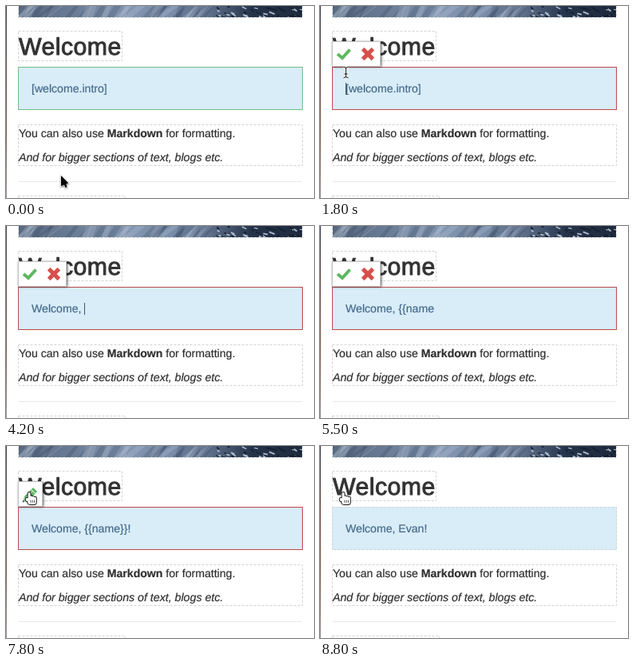
Recreate the animation shown at these times as an HTML page with a canvas. Size 386x240 px, loop 8.9 s.

```html
<!DOCTYPE html>
<html lang="en">
<head>
<meta charset="utf-8">
<title>Inline editing</title>
<style>
  html, body { margin: 0; width: 100%; height: 100%; overflow: hidden; background: #fff; }
  canvas { display: block; width: 386px; height: 240px; }
</style>
</head>
<body>
<canvas id="stage" width="386" height="240"></canvas>
<script>
const ctx = document.getElementById('stage').getContext('2d');
const LOOP = 8900, STEP = 100;
const FONT = '"Liberation Sans", Arial, sans-serif';
const RED = '#bd494a', GREEN = '#70bd86', GREY = '#d2d2d2', INK = '#2f2f2f';

const EDIT = 1100, SELECT = 1900, CLEAR = 2200, RETURN = 6700, SAVE = 7800, RELOAD = 8500;

// Typing comes in bursts with an even gap between keys
const TYPED = 'Welcome, {{name}}!';
const burst = (at, gap, length) => Array.from({ length }, (_, i) => at + i * gap);
const KEYS = [...burst(2700, 100, 2), ...burst(3100, 175, 13), ...burst(5700, 350, 3)];

const ENTRY = { x: 69, y: 212 }, GAP = { x: 48, y: 119 };
const BUTTON = { x: 29, y: 58 }, COPY = { x: 32, y: 83 };

function glide(from, to, start, end, t) {
  const k = Math.min(1, Math.max(0, (t - start) / (end - start)));
  return { x: from.x + (to.x - from.x) * k, y: from.y + (to.y - from.y) * k };
}

function pointer(t) {
  if (t <= 400) return glide(ENTRY, GAP, 0, 400, t);
  if (t <= EDIT) return glide(GAP, BUTTON, 400, 900, t);
  if (t < RETURN) return glide(BUTTON, COPY, EDIT, 1700, t);
  return glide(COPY, BUTTON, RETURN, 7400, t);
}

function seeded(seed) {
  return () => (seed = seed * 16807 % 2147483647) / 2147483647;
}

function text(str, x, y, size, color, style = '', weight = .2) {
  ctx.font = `${style} ${size}px ${FONT}`;
  ctx.textRendering = 'geometricPrecision';
  ctx.fillStyle = ctx.strokeStyle = color;
  ctx.lineWidth = weight;
  ctx.fillText(str, x, y);
  ctx.strokeText(str, x, y);
  return x + ctx.measureText(str).width;
}

function rect(x, y, w, h, color) {
  ctx.fillStyle = color;
  ctx.fillRect(x, y, w, h);
}

function frame(x, y, w, h, color, dashed) {
  ctx.strokeStyle = color;
  ctx.lineWidth = 1;
  ctx.setLineDash(dashed ? [3, 2] : []);
  ctx.strokeRect(x + .5, y + .5, w, h);
  ctx.setLineDash([]);
}

function line(points, color, width) {
  ctx.beginPath();
  points.forEach(([x, y]) => ctx.lineTo(x, y));
  ctx.strokeStyle = color;
  ctx.lineWidth = width;
  ctx.stroke();
}

function at(x, y, draw) {
  ctx.save();
  ctx.translate(x, y);
  draw();
  ctx.restore();
}

function gradient(x, y, ...colors) {
  const g = ctx.createLinearGradient(0, 0, x, y);
  colors.forEach((c, i) => g.addColorStop(i / (colors.length - 1), c));
  return g;
}

// Blurred snow slopes, with a dark rocky ridge on the right
function photo() {
  const rnd = seeded(41);
  ctx.save();
  ctx.beginPath();
  ctx.rect(16, 0, 355, 14);
  ctx.clip();
  rect(0, 0, 386, 14, gradient(386, 0, '#53647b', '#677a93', '#8195b0', '#7589a5', '#25334a', '#1c283b'));
  for (let i = 0; i < 36; i++) {
    const x = rnd() * 250, slope = 6 + rnd() * 20;
    line([[x, 16], [x + slope, -2]], rnd() < .5 ? 'rgba(210,222,236,.2)' : 'rgba(40,55,78,.2)', 2 + rnd() * 7);
  }
  for (let i = 0; i < 45; i++) {
    const x = 262 + rnd() * 110, y = rnd() * 14;
    line([[x, y], [x + 2 + rnd() * 5, y + 1 + rnd() * 2]], rnd() < .4 ? '#aebccb' : '#141e2d', 1 + rnd());
  }
  ctx.restore();
}

function panel(y, w) {
  ctx.save();
  ctx.shadowColor = 'rgba(0,0,0,.65)';
  ctx.shadowBlur = 3;
  ctx.shadowOffsetX = ctx.shadowOffsetY = 1;
  rect(15, y, w, 31, '#fff');
  ctx.restore();
  frame(15, y, w - 1, 31, '#c4c4c4');
}

function pencil(y) {
  panel(y, 31);
  at(21, y + 26, () => {
    ctx.rotate(-Math.PI / 4);
    ctx.beginPath();
    ctx.moveTo(0, 0);
    ctx.lineTo(6, -3.5);
    ctx.lineTo(6, 3.5);
    ctx.fillStyle = '#9ccb9c';
    ctx.fill();
    rect(6, -3.5, 16, 7, '#58b55c');
    rect(6, -1.5, 12, 1.5, '#a5dba5');
    rect(18, -3.5, 1, 7, '#e0f0df');
    rect(0, -1, 2.5, 2, '#3f7f45');
  });
}

function choices() {
  panel(44, 61);
  line([[22, 60], [28, 65], [37.5, 54.5]], '#5cb85f', 4);
  at(60, 60, () => {
    ctx.rotate(Math.PI / 4);
    rect(-9, -2.5, 18, 5, '#d6504c');
    rect(-2.5, -9, 5, 18, '#d6504c');
  });
}

function outlined(fill, outline, width) {
  ctx.strokeStyle = outline;
  ctx.lineWidth = width;
  ctx.stroke();
  ctx.fillStyle = fill;
  ctx.fill();
}

function arrow() {
  ctx.shadowColor = 'rgba(0,0,0,.4)';
  ctx.shadowBlur = 2;
  ctx.shadowOffsetY = 1;
  line([[4, 9], [6.8, 15.2]], '#fff', 4);
  ctx.beginPath();
  ctx.moveTo(0, 0);
  ctx.lineTo(0, 13);
  ctx.lineTo(9.2, 9.2);
  ctx.closePath();
  outlined('#000', '#fff', 1.6);
  ctx.shadowColor = 'transparent';
  line([[4, 8], [6.5, 14.6]], '#000', 2.4);
}

function beam() {
  for (const [color, width] of [['#fff', 2.6], ['#222', 1.1]]) {
    line([[.5, -6], [.5, 6]], color, width);
    line([[-1.5, 2], [2.5, 2]], color, width);
    for (const end of [-1, 1]) line([[-2.5, 7 * end], [.5, 5.5 * end], [3.5, 7 * end]], color, width);
  }
}

function hand() {
  ctx.scale(.88, .88);
  ctx.beginPath();
  ctx.roundRect(-1.6, 0, 3.4, 12, 1.6);
  for (let i = 0; i < 3; i++) ctx.roundRect(1.6 + i * 2.7, 5.2 + i * .6, 3, 8, 1.4);
  ctx.roundRect(-4.8, 8, 4, 4.5, 1.6);
  ctx.roundRect(-2, 9, 12, 8, 3);
  outlined('#fff', '#111', 2.2);
  for (let x = 2.2; x < 8; x += 2.6) line([[x, 11], [x, 14.5]], '#222', .9);
}

function cursor(t) {
  if (t >= SELECT && t < RETURN) return;
  const { x, y } = pointer(t);
  const onButton = x < 46 && y < 76;
  const editing = t > EDIT && t < SAVE;
  at(Math.round(x), Math.round(y), onButton ? hand : editing ? beam : arrow);
}

function intro(t) {
  rect(15, 76, 357, 54, '#d8edf8');
  frame(15, 76, 356, 53, t < 300 ? GREEN : t < RELOAD ? RED : GREY, t >= RELOAD);

  const count = KEYS.filter(k => k <= t).length;
  const copy = t < CLEAR ? '[welcome.intro]' : t < RELOAD ? TYPED.slice(0, count) : 'Welcome, Evan!';
  const selected = t >= SELECT && t < CLEAR;
  if (selected) rect(32, 95, 95, 17, '#b2d4f5');
  const end = text(copy, 32, 108, 14.1, '#46698a');

  if (t < EDIT || t >= 7400 || selected) return;
  const since = count ? KEYS[count - 1] : t < CLEAR ? EDIT : CLEAR;
  const lit = Math.floor((t - since) / 300) % 2 === 0;
  if (lit) rect(t < CLEAR ? 32 : Math.round(end), 96, 1, 15, '#3c566e');
}

function article(t) {
  const hovered = t >= 200 && t < 800;
  frame(15, 148, 356, 51, hovered ? RED : GREY, !hovered);
  let x = text('You can also use ', 16, 164, 14.1, INK);
  x = text('Markdown', x, 164, 14.1, INK, 'bold');
  text(' for formatting.', x, 164, 14.1, INK);
  text('And for bigger sections of text, blogs etc.', 16, 194, 14.2, INK, 'italic');
  if (hovered) pencil(116);
}

function heading() {
  frame(15, 31, 130, 37, GREY, true);
  ctx.letterSpacing = '0.5px';
  text('Welcome', 16, 61, 30.2, '#333', '', 1);
  ctx.letterSpacing = '0px';
}

function draw(t) {
  rect(0, 0, 386, 240, '#fff');
  rect(0, 0, 1, 240, gradient(0, 240, '#394350', '#6d5048', '#80604f', '#9b9696'));
  photo();
  frame(15, -10, 356, 24, GREY, true);
  heading();
  intro(t);
  article(t);
  rect(16, 219, 355, 1, '#eaeaea');
  frame(15, 237, 134, 20, GREY, true);
  if (t >= EDIT && t < SAVE) choices();
  else if (t >= 300 && t < RELOAD) pencil(44);
  cursor(t);
}

const start = performance.now();
function tick() {
  const t = (performance.now() - start) % LOOP;
  draw(Math.floor(t / STEP) * STEP);
  requestAnimationFrame(tick);
}
tick();
</script>
</body>
</html>
```
